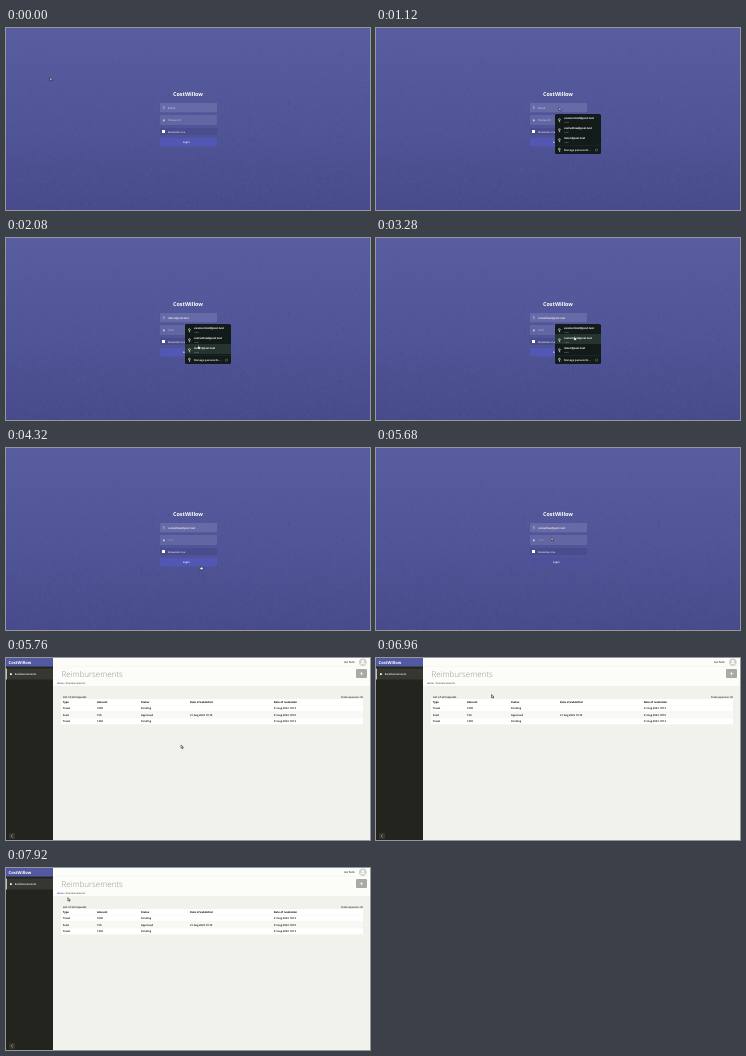
Animation, 364 px wide and 182 px high, one loop 8000 ms. Source, as an HTML page:

```html
<!DOCTYPE html>
<html lang="en">
<head>
<meta charset="utf-8">
<title>Sign in and expense list</title>
<style>
html, body { margin: 0; width: 100%; height: 100%; overflow: hidden; background: #4f5498; }
svg { display: block; width: 100vw; height: 100vh; }
text { font-family: "Open Sans", "Noto Sans", sans-serif; text-rendering: geometricPrecision; white-space: pre; }
</style>
</head>
<body>
<svg id="stage" viewBox="0 0 364 182" preserveAspectRatio="none">
  <defs>
    <linearGradient id="sky" x2="0" y2="1">
      <stop offset="0" stop-color="#575d9f"/>
      <stop offset=".55" stop-color="#505597"/>
      <stop offset="1" stop-color="#484b8b"/>
    </linearGradient>
  </defs>
  <g id="login"></g>
  <g id="menu"></g>
  <g id="page"></g>
  <g id="cursor"></g>
</svg>
<script>
const LOOP = 8000, STEP = 80;
const BRAND = "CostWillow";
const $ = id => document.getElementById(id);

function add(parent, tag, attrs, content) {
  const el = document.createElementNS("http://www.w3.org/2000/svg", tag);
  for (const k in attrs) el.setAttribute(k, attrs[k]);
  if (content !== undefined) el.textContent = content;
  parent.appendChild(el);
  return el;
}
const box = (p, x, y, width, height, fill, rx = 0) =>
  add(p, "rect", { x, y, width, height, fill, rx });
const label = (p, x, y, size, fill, str, more = {}) =>
  add(p, "text", { x, y, "font-size": size, fill, "font-weight": 600, ...more }, str);
const line = (p, d, stroke, w = .4) =>
  add(p, "path", { d, stroke, "stroke-width": w, fill: "none" });
const show = (el, on) => el.setAttribute("display", on ? "inline" : "none");

function random(seed) {
  return () => (seed = (seed * 16807) % 2147483647) / 2147483647;
}

// Faint wallpaper, denser toward the bottom
function wallpaper(g) {
  const rnd = random(71);
  let dark = "", pale = "";
  for (let i = 0; i < 2400; i++) {
    const x = (rnd() * 364).toFixed(1), y = (Math.sqrt(rnd()) * 182).toFixed(1);
    const mark = `M${x} ${y}l${(rnd() * 2 - 1).toFixed(1)} ${(.8 + rnd() * 1.6).toFixed(1)}`;
    if (i % 2) dark += mark; else pale += mark;
  }
  line(g, dark, "rgba(35,38,95,.1)", .7);
  line(g, pale, "rgba(150,158,220,.09)", .7);
}

function userIcon(g, x, y, color) {
  add(g, "circle", { cx: x, cy: y - .6, r: .6, fill: "none", stroke: color, "stroke-width": .4 });
  line(g, `M${x - 1} ${y + 1.3}q1-1.6 2 0`, color);
}
function lockIcon(g, x, y, color) {
  box(g, x - .8, y - .2, 1.6, 1.4, color, .2);
  line(g, `M${x - .5} ${y}v-.6q.5-1 1 0v.6`, color, .3);
}
function keyIcon(g, x, y) {
  add(g, "circle", { cx: x, cy: y - .4, r: .9, fill: "none", stroke: "#f0f5f3", "stroke-width": .6 });
  line(g, `M${x} ${y + .5}v1.4h.8`, "#f0f5f3", .6);
}

const login = $("login");
box(login, 0, 0, 364, 182, "url(#sky)");
wallpaper(login);
label(login, 182, 67.8, 5.4, "#fff", BRAND, { "text-anchor": "middle", "font-weight": 700 });
box(login, 154, 75, 57, 9.3, "#666ba7", .8);
box(login, 154, 87, 57, 10, "#6267a4", .8);
box(login, 154, 100, 57, 7, "#494d8e", .6);
userIcon(login, 157.8, 79.6, "#d2d4ee");
lockIcon(login, 157.8, 92, "#d2d4ee");
const email = label(login, 162, 80.5, 2.7, "#c4c7e6", "Email");
const pass = label(login, 162, 93, 2.7, "#b5b8dd", "Password");
box(login, 156, 102, 3, 3, "#fff");
label(login, 162, 104.5, 2.4, "#e6e7f6", "Remember me");
const button = box(login, 154, 110, 57, 8.6, "#5157b3", .8);
label(login, 180.2, 115.2, 2.6, "#fff", "Login", { "text-anchor": "middle" });

const menu = $("menu");
const people = ["vosmarintel@post.test", "costwillow@post.test", "itelor@post.test"];
box(menu, 179, 86, 46, 40, "#121a1a", 1.6);
const highlight = box(menu, 179, 96, 46, 10, "#26342f");
people.forEach((name, i) => {
  const y = 86 + i * 10;
  keyIcon(menu, 183.4, y + 6);
  label(menu, 188, y + 4.8, 2.65, "#fff", name, { "font-weight": 700 });
  label(menu, 188, y + 8.6, 2.2, "#aab6b2", "••••••");
});
line(menu, "M179 117.4H225", "#2d3937", .4);
keyIcon(menu, 183.4, 121.5);
label(menu, 188, 122.8, 2.65, "#fff", "Manage passwords…");
line(menu, "M219.5 121h2v2h-2z", "#7f8b88", .4);

const page = $("page");
box(page, 0, 0, 364, 182, "#f1f2ec");
box(page, 47, 0, 317, 28.5, "#fcfcf8");
line(page, "M47 8.5H364", "#eeeeea", .4);
line(page, "M47 28.7H364", "#e6e6e0", .4);
box(page, 0, 0, 47, 182, "#22241d");
box(page, 0, 0, 47, 8.6, "#5359a1");
label(page, 2.6, 5.7, 4.1, "#fff", BRAND, { "font-weight": 700 });
box(page, 0, 10.5, 47, 11, "#353731");
box(page, 0, 10.5, .8, 11, "#e4e5e0");
box(page, 4, 15.2, 1.8, 1.8, "#fff", .3);
label(page, 8.8, 17, 2.6, "#fff", "Reimbursements");
box(page, 3, 175, 6, 6, "#34362f", .6);
line(page, "M6.6 176.5l-1.5 1.5 1.5 1.5", "#c8c9c4", .5);
label(page, 348.5, 5, 2.7, "#1c1c1c", "Ivo Tarn", { "text-anchor": "end" });
add(page, "circle", { cx: 356.8, cy: 4.2, r: 3.8, fill: "#cfcfcc" });
add(page, "circle", { cx: 356.8, cy: 3.2, r: 1.3, fill: "#fcfcf8" });
line(page, "M354.5 6.3q2.3-2.4 4.6 0", "#fcfcf8", 1.1);
label(page, 55.5, 18.6, 8, "#8f8f8b", "Reimbursements", { "font-weight": 300 });
box(page, 350, 11, 11, 9, "#a9aaa6", 1);
line(page, "M355.5 14v3.4M353.8 15.7h3.4", "#fff", .6);
label(page, 51, 25.5, 2.3, "#2d3a92", "Home");
label(page, 58.6, 25.5, 2.3, "#555", "/ Reimbursements");
label(page, 56.8, 39.7, 2.7, "#222", "List of all requests");
label(page, 357, 39.7, 2.5, "#222", "Total expenses: 00", { "text-anchor": "end" });
box(page, 55, 41, 302, 25.6, "#fff");
box(page, 55, 53.7, 302, 6.4, "#f8f9f4");
const columns = [56.8, 91, 135, 184, 267.7];
const rows = [
  ["Type", "Amount", "Status", "Date of submittal", "Date of resolution"],
  ["Travel", "1000", "Pending", "", "21 Aug 2023 10:13"],
  ["Food", "150", "Approved", "21 Aug 2023 10:10", "21 Aug 2023 10:10"],
  ["Travel", "1350", "Pending", "", "21 Aug 2023 10:13"]
];
rows.forEach((row, r) => {
  const y = 45 + r * 6.43;
  row.forEach((str, c) => label(page, columns[c], y, 2.6, "#000", str,
    { "font-weight": r ? 600 : 700 }));
  line(page, `M55 ${y + 2.2}H357`, "#e7e8e3", .25);
});

const cursor = $("cursor");
const arrow = add(cursor, "path", { d: "M0 0v3.2l.8-.7.6 1.3.6-.3-.6-1.2h1.1z" });
const hand = add(cursor, "path", { d: "M0-.9q.5-.5.8 0v1.5l1.5.4q.5.3.3 1l-.4 1.3H.3L-1 1.6q0-.7.6-.4L0 1.5z" });
for (const el of [arrow, hand]) {
  el.setAttribute("fill", "#fff");
  el.setAttribute("stroke", "#111");
  el.setAttribute("stroke-width", .5);
}

// Pointer stops: time, x, y
const path = [
  [0, 44, 49.5], [240, 147, 86], [640, 147, 86], [960, 183, 79.5],
  [1440, 183, 79.5], [1680, 188, 91], [2080, 192, 108],
  [2480, 192, 108], [2640, 198, 99], [3520, 198, 99], [3600, 199, 100],
  [3920, 199, 100], [4320, 194.5, 118.5], [4800, 183, 115.5],
  [5280, 183, 115.5], [5680, 175.2, 89.5], [5760, 175, 87],
  [6160, 175, 87], [6640, 118, 38], [6880, 118, 38],
  [7280, 94, 24], [7760, 61.5, 28.8], [7920, 61.8, 29.6], [8000, 61.8, 29.6]
];
function pointer(t) {
  let i = 0;
  while (i < path.length - 2 && t >= path[i + 1][0]) i++;
  const [t0, x0, y0] = path[i], [t1, x1, y1] = path[i + 1];
  let k = Math.max(0, Math.min(1, (t - t0) / (t1 - t0)));
  k = k * k * (3 - 2 * k);
  return [x0 + (x1 - x0) * k, y0 + (y1 - y0) * k];
}

function setText(el, str, fill) {
  el.textContent = str;
  el.setAttribute("fill", fill);
}

function draw(time) {
  const t = Math.floor(time / STEP) * STEP;
  const [x, y] = pointer(t);
  const onPage = t >= 5760, open = t >= 1040 && t < 3440;
  show(login, !onPage);
  show(page, onPage);
  show(menu, open);

  let pick = open && y > 86 ? Math.min(2, Math.floor((y - 86) / 10)) : -1;
  if (t >= 3440) pick = 1;
  show(highlight, pick >= 0);
  highlight.setAttribute("y", 86 + Math.max(0, pick) * 10);
  if (pick < 0) {
    setText(email, "Email", "#c4c7e6");
    setText(pass, "Password", "#b5b8dd");
  } else {
    setText(email, people[pick], "#fff");
    setText(pass, "••••••", open ? "#e8eaf6" : "#a9addb");
  }
  button.setAttribute("fill", t >= 4880 ? "#4c5199" : "#5157b3");

  const pointing = open && pick >= 0 || t >= 4240 && t < 5440 || t >= 7200 && t < 7520;
  show(arrow, !pointing);
  show(hand, pointing);
  cursor.setAttribute("transform", `translate(${x.toFixed(2)} ${y.toFixed(2)})`);
}

const start = performance.now();
function tick() {
  draw((performance.now() - start) % LOOP);
  requestAnimationFrame(tick);
}
draw(0);
requestAnimationFrame(tick);
</script>
</body>
</html>
```
